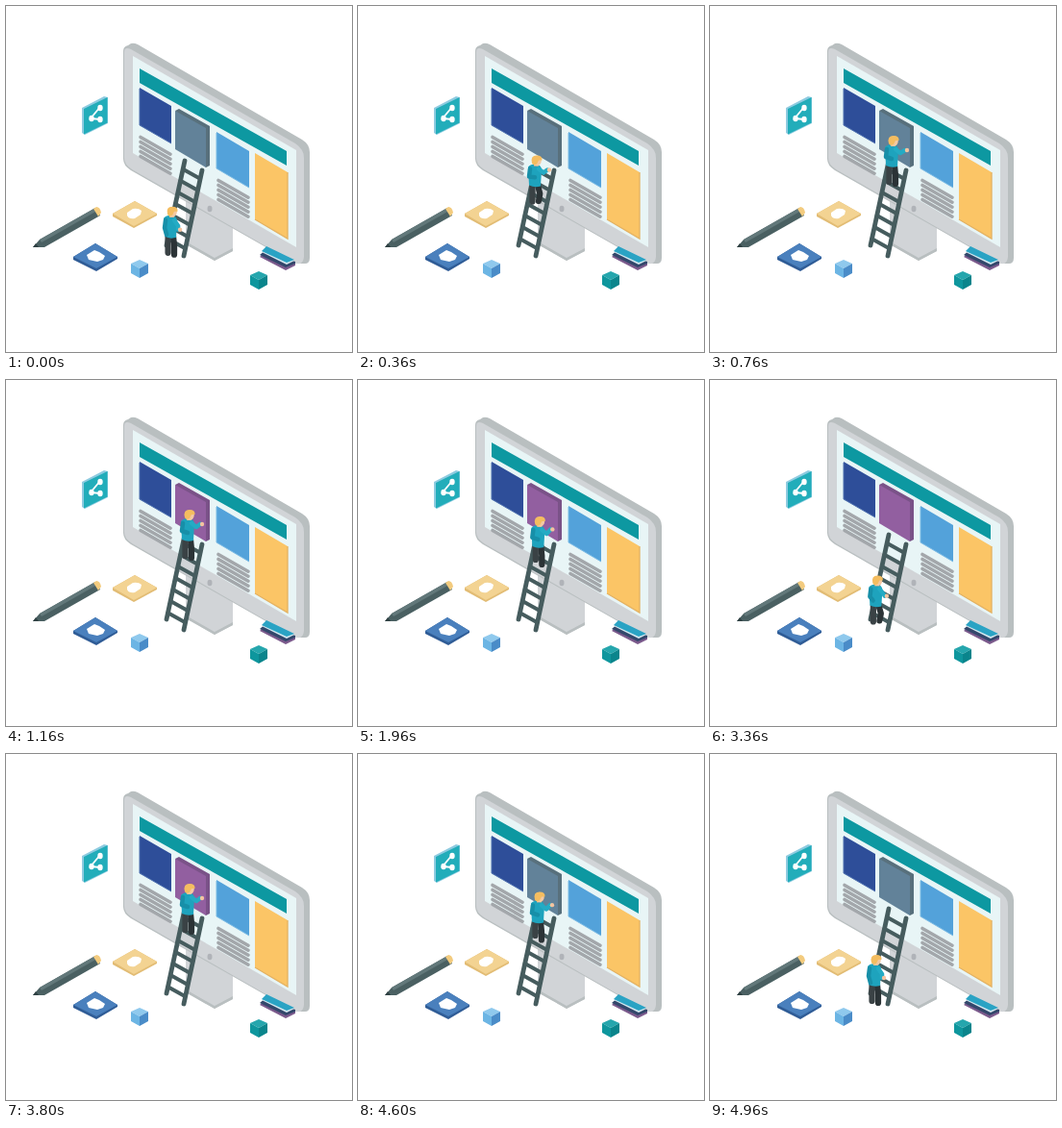
Write an HTML page that moves like this. It is 360x360 px and loops after 5 s.

```html
<!DOCTYPE html>
<html lang="en">
<head>
<meta charset="utf-8">
<title>Building a page</title>
<style>
  html, body { margin: 0; width: 100%; height: 100%; overflow: hidden; background: #fff; }
  svg { display: block; width: 100%; height: 100%; }
  .limb { fill: none; stroke-linecap: round; stroke-linejoin: round; }
</style>
</head>
<body>
<svg viewBox="0 0 360 360">
  <!-- stand and monitor -->
  <path d="M187 202L236 230V255L217 265L187 248z" fill="#d1d4d7"/>
  <path d="M187 248L217 265 236 255V252L217 262 187 245z" fill="#b9bfc0"/>
  <path d="M122 47Q122 42 127 41L130 39Q133 38 137 40L308 139Q316 144 316 152V262Q316 268 311 268H303Q299 267 295 265L130 171Q122 166 122 159z" fill="#b9bfc0"/>
  <path d="M123 48Q123 42 130 45L301 143Q310 149 310 158V261Q309 271 300 267L131 170Q123 165 123 158z" fill="#d1d4d7"/>
  <path d="M132 52L302 150V251L132 153z" fill="#e8f5f6"/>
  <ellipse cx="212" cy="211" rx="2.5" ry="3.2" fill="#b0b3b8"/>

  <!-- books -->
  <path d="M264 261L270 256 301 267V270L291 275z" fill="#7b5a8c"/>
  <path d="M264 259L270 254 301 266V268L291 272z" fill="#33476b"/>
  <path d="M266 256L271 252 300 265 292 269z" fill="#d5e8ef"/>
  <path d="M266 255L271 250 300 264 292 267z" fill="#2aa3c4"/>

  <!-- page -->
  <path d="M139 65L292 151V166L139 80z" fill="#0d98a1"/>
  <path d="M139 85L172 104V143L139 124z" fill="#2e4e99"/>
  <path d="M139 86V124L172 143" fill="none" stroke="#4f71b0"/>
  <path d="M219 131L253 151V189L219 169z" fill="#53a2da"/>
  <path d="M219 132V169L253 189" fill="none" stroke="#7dbce5"/>
  <path d="M259 153L293 173V242L259 222z" fill="#fbc566"/>
  <path d="M293 173V242L259 222" fill="none" stroke="#e4b262" stroke-width="1.3"/>
  <g id="textLines" stroke="#a3a7ab" stroke-width="3.6" stroke-linecap="round"/>
  <path id="panelEdge" d="M176 109L180 107 212 125V166L208 168z"/>
  <path id="panelFace" d="M176 109L208 127V168L176 149z"/>

  <!-- share tile -->
  <path d="M79 106L102 94 106 95V122L82 134 79 132z" fill="#8ecbe0"/>
  <path d="M81 107L105.500 95V121.500L81 133.500z" fill="#22adba"/>
  <path d="M98 105L88 117 98 118" fill="none" stroke="#fff" stroke-width="1.8"/>
  <g fill="#fff"><ellipse cx="98" cy="106" rx="2.700" ry="3.200"/><ellipse cx="89" cy="117" rx="2.700" ry="3.200"/><ellipse cx="98" cy="118" rx="2.700" ry="3.200"/></g>

  <!-- pen -->
  <path d="M28 251L35 243 93 210 98 218 40 251z" fill="#4a6062"/>
  <path d="M35 243L93 210 95 213 37 246z" fill="#62787a"/>
  <path d="M28 251L31 247 34 251z" fill="#2f4143"/>
  <path d="M91 211L94 209Q98 209 99 215L96 219z" fill="#f3cb7e"/>

  <!-- floor tiles -->
  <path d="M111 216L134 203 157 216V218L133 231 111 219z" fill="#e2bc74"/>
  <path d="M111 216L134 203 157 216 133 229z" fill="#f3d392"/>
  <path d="M126 215L132 211Q138 210 141 213L140 217 134 221Q128 222 126 218z" fill="#fff"/>
  <path d="M70 261L93 247 116 261V263L94 276 70 264z" fill="#2f5c96"/>
  <path d="M70 261L93 247 116 261 94 273z" fill="#4a80bd"/>
  <path d="M84 259L92 254 97 256 103 260 101 264 95 266 86 264z" fill="#fff"/>
  <g id="cubes"/>

  <g id="ladder" class="limb" stroke="#465c5e"/>

  <!-- worker, feet at 0,0 -->
  <g id="worker">
    <path id="farLeg" class="limb" stroke="#2b3336" stroke-width="6.2"/>
    <path id="nearLeg" class="limb" stroke="#3a4245" stroke-width="6.2"/>
    <path d="M-8 -40Q-6 -43 0 -43Q6 -42 6 -37L5 -20Q-1 -18 -7 -21z" fill="#1ea3bd"/>
    <path id="backArm" class="limb" stroke="#178fa8" stroke-width="4.5"/>
    <path id="arm" class="limb" stroke="#24abc4" stroke-width="4.5"/>
    <circle id="hand" r="2.2" fill="#f4c4a0"/>
    <path d="M-2 -45h5v4h-5z" fill="#efb98f"/>
    <ellipse cx="1" cy="-46.500" rx="4.800" ry="5.200" fill="#f4c9a2"/>
    <path d="M-4 -44Q-6 -52 1 -52Q7 -52 6.500 -47L3 -47 1 -43Q-3 -41 -4 -44z" fill="#f4bd60"/>
  </g>
</svg>
<script>
const LOOP = 5000;
const el = id => document.getElementById(id);
const clamp = v => Math.min(1, Math.max(0, v));
const span = (t, start, end) => clamp((t - start) / (end - start));
const mix = (a, b, p) => a + (b - a) * p;
const blend = (a, b, p) => `rgb(${a.map((v, i) => Math.round(mix(v, b[i], p)))})`;

function add(parent, d, attrs = {}) {
  const path = document.createElementNS("http://www.w3.org/2000/svg", "path");
  Object.entries({ d, ...attrs }).forEach(([key, value]) => path.setAttribute(key, value));
  el(parent).append(path);
}

for (const [x, y] of [[140, 136.5], [221, 181.5]])
  for (let i = 0; i < 5; i++) add("textLines", `M${x} ${y + i * 5}l31 17.7`);

function cube(x, y, top, left, right) {
  add("cubes", `M${x} ${y - 9}l9 4-9 5-9-5z`, { fill: top });
  add("cubes", `M${x - 9} ${y - 5}l9 5v10l-9-5z`, { fill: left });
  add("cubes", `M${x + 9} ${y - 5}l-9 5v10l9-5z`, { fill: right });
}
cube(139, 273, "#8fc9ed", "#6cb5e4", "#4a8cc8");
cube(263, 285, "#25a6ad", "#0e969d", "#0a858c");

for (let i = 0; i < 7; i++) {
  const p = 0.1 + i * 0.137;
  add("ladder", `M${186 - 19 * p} ${161 + 88 * p}l18 10`, { "stroke-width": 4 });
}
add("ladder", "M186 161L167 249M204 171L185 260", { "stroke-width": 4.8 });

const GREY = { face: [98, 130, 153], edge: [88, 112, 124] };
const PURPLE = { face: [146, 95, 160], edge: [122, 82, 136] };

function draw(now) {
  const t = now % LOOP;
  const height = span(t, 0, 500) - span(t, 1920, 2360)
    + span(t, 3325, 3800) - span(t, 4555, 4960);
  const purple = span(t, 1000, 1160) - span(t, 3880, 4080);
  const press = Math.sin(Math.PI * span(t, 560, 900));

  el("panelFace").setAttribute("fill", blend(GREY.face, PURPLE.face, purple));
  el("panelEdge").setAttribute("fill", blend(GREY.edge, PURPLE.edge, purple));

  // Hands and feet alternate over the rungs and settle at both ends.
  const stride = Math.sin(height * Math.PI * 6);
  const lift = side => -3 * Math.max(0, side * stride);
  el("worker").setAttribute("transform",
    `translate(${mix(172, 190, height)} ${mix(261, 187, height)})`);
  el("farLeg").setAttribute("d", `M2 -21L${3 - lift(1) / 2} ${-11 + lift(1) / 2}L3 ${-2 + lift(1)}`);
  el("nearLeg").setAttribute("d", `M-3.5 -21L-3.5 ${-11 + lift(-1) / 2}L-3.5 ${-4 + lift(-1)}`);

  const reach = clamp(height * 4);
  const handX = mix(9, 14, reach) + press;
  const handY = mix(-28, -37, reach) + lift(-1) / 2;
  el("arm").setAttribute("d", `M3 -38L${mix(7, 8, reach)} ${mix(-32, -34, reach)}L${handX - 2} ${handY}`);
  el("backArm").setAttribute("d", `M-6 -38L-7 -30L${mix(-5, -1, reach)} ${mix(-23, -28, reach) + lift(1) / 2}`);
  el("hand").setAttribute("cx", handX);
  el("hand").setAttribute("cy", handY);
}

function tick() {
  draw(performance.now());
  requestAnimationFrame(tick);
}
tick();
</script>
</body>
</html>
```
